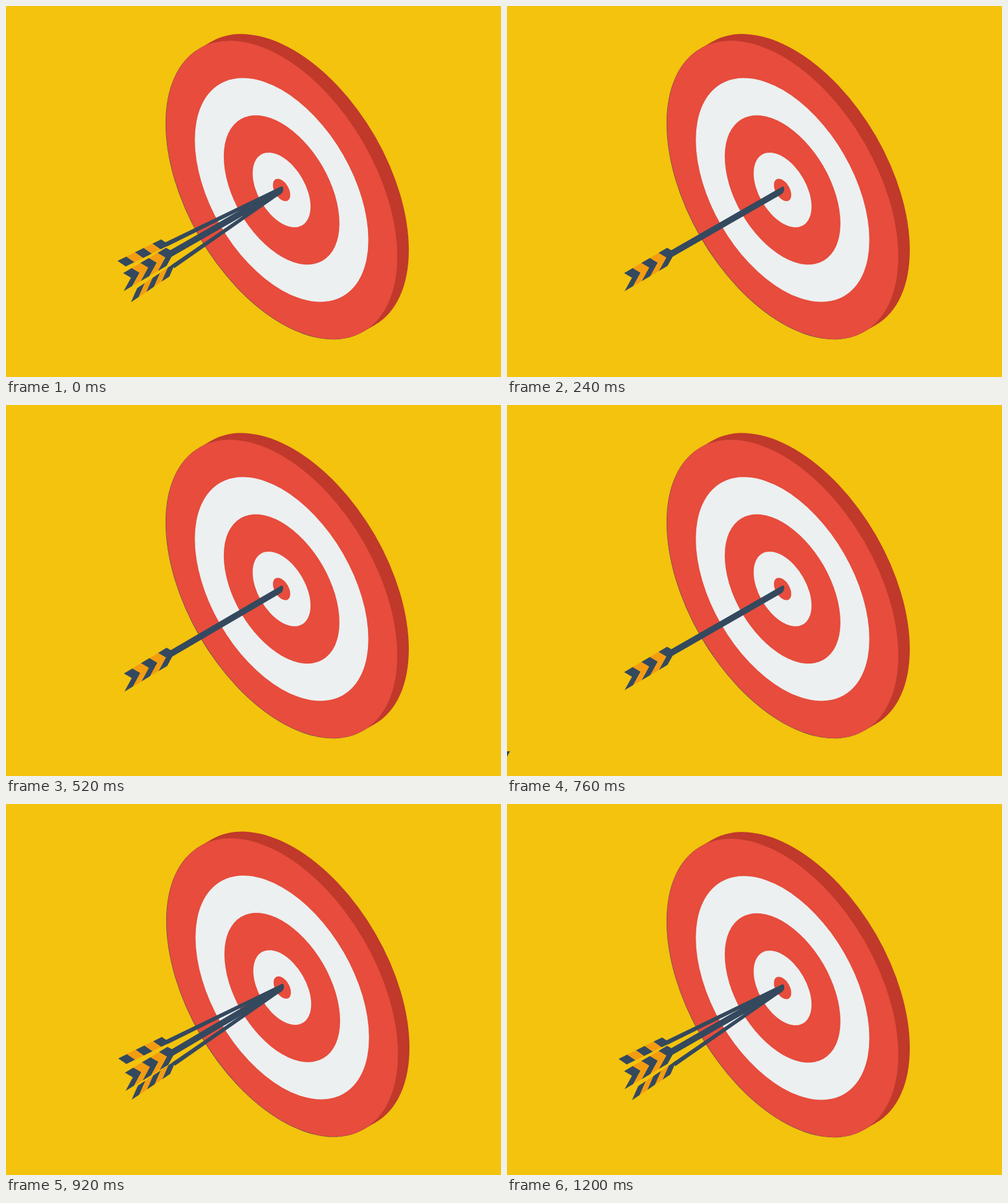
Write an HTML page with a canvas that moves like this. It is 800 px wide and 600 px high and loops after 1680 ms.

```html
<!DOCTYPE html>
<html lang="en">
<head>
<meta charset="utf-8">
<title>Bullseye</title>
<style>
html, body { margin: 0; width: 100%; height: 100%; overflow: hidden; background: #f3c30d; }
canvas { display: block; }
</style>
</head>
<body>
<canvas id="stage" width="800" height="600"></canvas>
<script>
const ctx = document.getElementById('stage').getContext('2d');
const LOOP = 1680, STEP = 40;
const YELLOW = '#f3c30d', RED = '#e74c3c', SHADE = '#c0392b', WHITE = '#ecf0f1';
const NAVY = '#34495e', ORANGE = '#f39c12';
const CX = 445.4, CY = 297.5, RADIUS = 187;
const DEPTH = [18.6, -10.8];
const SLOPE = Math.tan(Math.PI / 6), STRETCH = 1 / Math.cos(Math.PI / 6);

// Keyed values as [time, value] pairs, eased between neighbours.
const ARROW_FLY = [[80, 1], [160, 0]];
const PAIR_FLY = [[760, 1], [840, 0]];
const PUSH = [[160, 0], [200, 8], [240, 0], [840, 0], [880, 10.5], [920, 1.3], [960, 0]];
const SWAY = [[240, 0], [320, -3], [400, 2.05], [480, -1], [560, 0],
  [840, 0], [880, -0.9], [920, -0.75], [1000, -0.43], [1200, 0]];

const smooth = k => (1 - Math.cos(Math.PI * k)) / 2;
const linear = k => k;

function track(t, keys, ease) {
  if (t <= keys[0][0]) return keys[0][1];
  for (let i = 1; i < keys.length; i++) {
    const [t0, a] = keys[i - 1], [t1, b] = keys[i];
    if (t <= t1) return a + (b - a) * ease((t - t0) / (t1 - t0));
  }
  return keys[keys.length - 1][1];
}

function poly(color, points) {
  ctx.fillStyle = color;
  ctx.beginPath();
  points.forEach(([x, y]) => ctx.lineTo(x, y));
  ctx.closePath();
  ctx.fill();
}

// A circle lying in the isometric side plane.
function disc(color, r, dx = 0, dy = 0) {
  ctx.save();
  ctx.transform(1, SLOPE, 0, STRETCH, CX + dx, CY + dy);
  ctx.fillStyle = color;
  ctx.beginPath();
  ctx.arc(0, 0, r, 0, Math.PI * 2);
  ctx.fill();
  ctx.restore();
}

function drawBoard() {
  const [dx, dy] = DEPTH;
  const x = RADIUS * Math.SQRT1_2, y = x * (SLOPE + STRETCH);
  disc(SHADE, RADIUS, dx, dy);
  poly(SHADE, [[CX - x, CY - y], [CX - x + dx, CY - y + dy],
    [CX + x + dx, CY + y + dy], [CX + x, CY + y]]);
  disc(NAVY, RADIUS, -0.5, 0.3);
  [187, 140.2, 93.5, 46.75, 14].forEach((r, i) => disc(i % 2 ? WHITE : RED, r));
}

// Five bands, each bounded by the edge profile moved along the feather.
function feather(edge, dx, dy) {
  const at = i => edge.map(([x, y]) => [x + dx * i / 5, y + dy * i / 5]);
  for (let i = 0; i < 5; i++) {
    poly(i % 2 ? ORANGE : NAVY, at(i).concat(at(i + 1).reverse()));
  }
}

function shaft(x0, y0, x1, y1, top, bottom) {
  ctx.fillStyle = NAVY;
  ctx.beginPath();
  ctx.moveTo(x0, y0);
  ctx.lineTo(442, top);
  ctx.quadraticCurveTo(448, 289.5, 448, 296);
  ctx.quadraticCurveTo(448, 302.5, 441, bottom);
  ctx.lineTo(x1, y1);
  ctx.closePath();
  ctx.fill();
}

function drawHead() {
  poly(NAVY, [[475, 281], [445, 281], [460, 307]]);
}

function drawArrow() {
  shaft(261, 397.5, 266, 406.5, 293.8, 306);
  feather([[189.3, 432], [202, 439.5], [190, 461.3]], 69.5, -41);
}

function drawPair() {
  shaft(256, 383, 260, 389, 293, 299.5);
  feather([[180.3, 412.2], [193.5, 421.3]], 70.5, -34.8);
  shaft(268, 418.5, 272, 424, 299, 306);
  feather([[212, 456.3], [202, 479]], 62, -41.5);
}

function flying(amount, draw) {
  ctx.save();
  ctx.translate(-470 * amount, 279 * amount);
  draw();
  if (amount > 0) drawHead();
  ctx.restore();
}

function render(t) {
  if (t < STEP) t = LOOP;
  ctx.fillStyle = YELLOW;
  ctx.fillRect(0, 0, 800, 600);

  const push = track(t, PUSH, smooth);
  ctx.save();
  ctx.translate(push * 0.83, -push * 0.56);
  drawBoard();
  if (t >= 760) flying(track(t, PAIR_FLY, linear), drawPair);
  if (t >= 80) {
    ctx.translate(445, 298);
    ctx.rotate(track(t, SWAY, smooth) * Math.PI / 180);
    ctx.translate(-445, -298);
    flying(track(t, ARROW_FLY, linear), drawArrow);
  }
  ctx.restore();
}

const start = performance.now();
function tick() {
  const t = (performance.now() - start) % LOOP;
  render(Math.floor(t / STEP) * STEP);
  requestAnimationFrame(tick);
}
tick();
</script>
</body>
</html>
```
